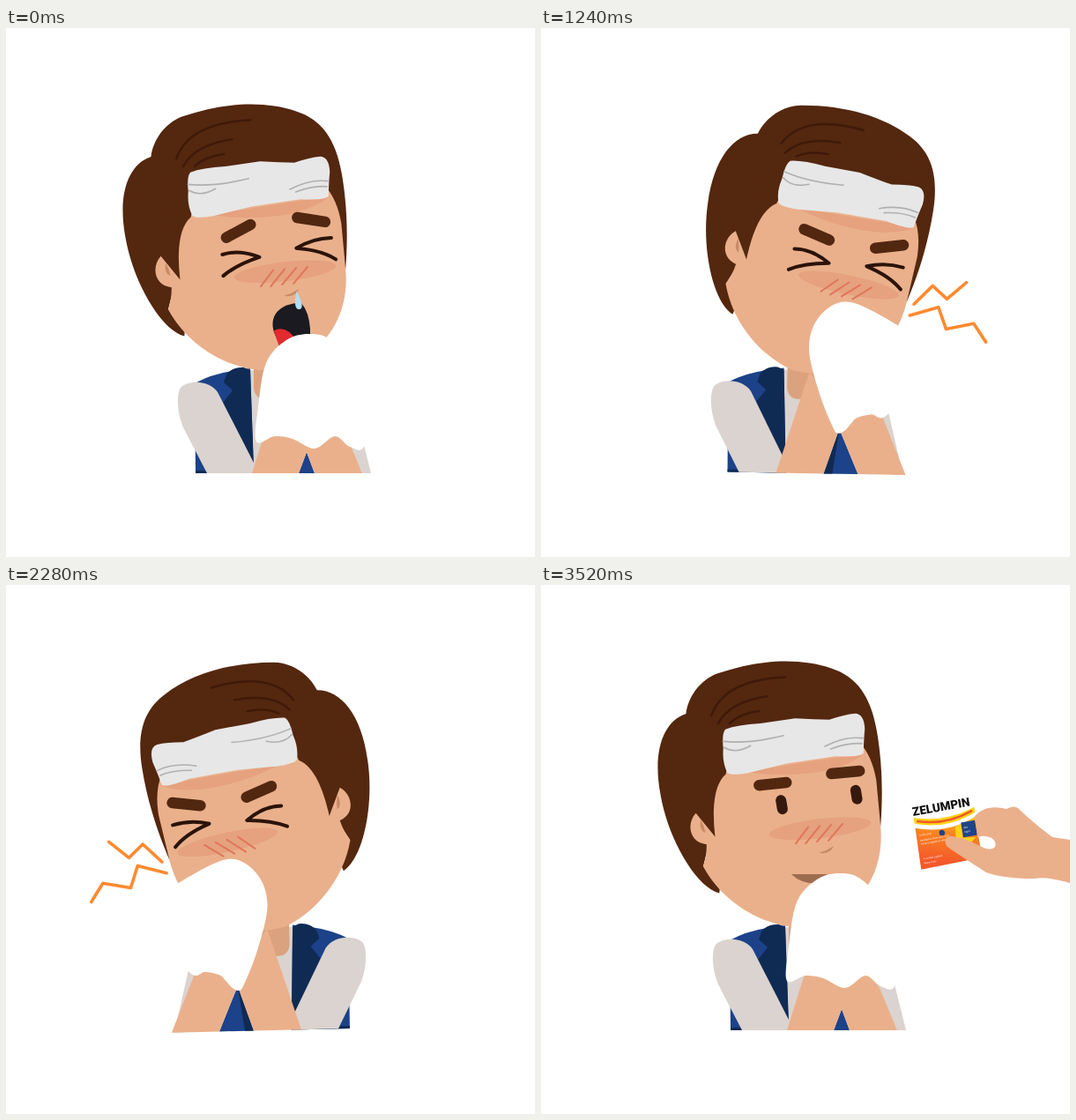
An HTML page that plays this animation: 600 by 600 pixels, repeating every 4280 ms.

```html
<!DOCTYPE html>
<html lang="en">
<head>
<meta charset="utf-8">
<style>
html, body { margin: 0; width: 100%; height: 100%; overflow: hidden; background: #fff; }
svg { display: block; width: 100vw; height: 100vh; }
.skin { fill: #eab08b; }
.blush { fill: #e6a17f; }
.shade { fill: #c78a64; }
.hair { fill: #54270f; }
.cloth { fill: #dbd3cf; }
.vest { fill: #1c4289; }
.navy { fill: #0f2b54; }
.line { fill: none; stroke-linecap: round; stroke-linejoin: round; }
.strands { stroke: #3f1a08; stroke-width: 2.5; }
.folds { stroke: #b0b0b0; stroke-width: 1.6; }
.brow { stroke: #522710; stroke-width: 12.5; }
.shut { stroke: #2b1309; stroke-width: 4; }
.open { stroke: #35190d; stroke-width: 12; }
.flush { stroke: #e0765a; stroke-width: 2; }
.spark { stroke: #ff8a30; stroke-width: 3.6; }
</style>
</head>
<body>
<svg viewBox="0 0 600 600">
  <defs>
    <linearGradient id="pack" x1="1" y1="0" x2=".6" y2="1">
      <stop offset="0" stop-color="#ffc81e"/>
      <stop offset=".4" stop-color="#f98420"/>
      <stop offset="1" stop-color="#f4582a"/>
    </linearGradient>
  </defs>

  <g id="figure">
    <g id="torso">
      <path class="cloth" d="M277 388H312L318 470 281 505Z"/>
      <path fill="#dba27f" d="M281 378V408Q282 420 293 421H325V378Z"/>
      <path class="vest" d="M214 403Q232 393 256 389L277 386 281 505H215Z"/>
      <path class="navy" d="M250 393Q257 384 270 385L277 388 281 497 246 425 257 411 247 402Z"/>
      <path class="navy" d="M215 502H281V505H215Z"/>
      <path class="cloth" d="M228 505L201 453C194 436 193 416 198 408C207 399 230 399 240 413L283 497 280 505Z"/>
    </g>

    <g id="head">
      <path class="hair" d="M207 129C212 112 228 94 250 90C300 82 345 88 378 106C405 120 417 145 417 185C417 230 409 268 403 292L300 240 205 285 197 303 216 312 210 336C185 325 163 265 163 215C162 165 180 133 207 129Z"/>
      <path class="skin" d="M240 204Q219 217 216 272L199 242C186 252 186 274 205 279Q203 292 197 303C211 345 249 378 286 388C350 395 398 355 403 292L407 240Q407 212 396 195L245 190Z"/>
      <path class="shade" d="M203 250Q199 262 206 266Q206 258 203 250Z"/>
      <path class="blush" d="M262 205L400 207Q375 221 335 219Q295 217 262 205Z"/>
      <path fill="#e7e7e7" d="M248 154Q262 151 288 154L328 155Q350 160 366 163Q385 160 396 161Q406 163 404 180Q400 195 398 207Q394 211 366 205L310 204 265 207Q245 207 242 203Q238 190 242 175Q243 158 248 154Z"/>
      <path class="line folds" d="M243 167Q272 175 312 172M243 174Q255 184 273 177M356 192Q380 184 400 190M362 196Q384 192 398 196"/>
      <path class="line strands" d="M235 136C250 108 285 102 325 107M241 146Q258 124 301 125M254 148Q268 139 289 140"/>
      <ellipse class="blush" cx="335" cy="283" rx="58" ry="11" transform="rotate(3 335 283)"/>
      <path class="line flush" d="M305 295L322 279M316 297L335 280M329 297L348 281M342 298L361 282"/>
      <path class="shade" d="M329 310Q338 309 347 305Q341 314 329 310Z"/>
      <path id="browL" class="line brow" d="M-15 0H16"/>
      <path id="browR" class="line brow" d="M-16 0H16"/>
      <g id="sick">
        <path class="line shut" d="M268 252Q288 249 309 262Q282 266 265 276M393 254Q372 251 352 259Q380 266 394 279"/>
        <path fill="#1b1a20" d="M311 349C308 330 322 317 347 321Q354 333 352 352L348 375 315 365Z"/>
        <path fill="#e12b2f" d="M311 347Q327 342 335 364L330 372 314 366Z"/>
        <path fill="#b5dcee" d="M344 307Q336 327 344 328Q351 327 344 307Z"/>
      </g>
      <g id="calm">
        <path class="line open" d="M296.600 244V254M382 247V257"/>
        <path fill="#9d6c4f" d="M294 328.500L334.500 335.400 330 345Q305 344 294 328.500Z"/>
      </g>
    </g>

    <path id="gap" class="vest"/>
    <path id="lapel" class="navy"/>
    <path id="sleeve" class="cloth"/>
    <path id="armL" class="skin"/>
    <path id="armR" class="skin"/>
    <path id="tissue" fill="#fff"/>
    <path id="sparks" class="line spark" d="M423 311L443 289 460 303 481 283M419 324L451 313 461 337 492 329 507 349"/>
  </g>

  <g id="hand">
    <g transform="translate(421 256) rotate(-10)">
      <path fill="#fff" d="M0 -8H69V67H0Z"/>
      <path fill="#ffd21a" d="M0 8Q35 20 70 8V14Q35 28 0 15Z"/>
      <path class="line" stroke="#ee5a24" stroke-width="2.500" d="M4 13Q35 23 66 12"/>
      <path fill="url(#pack)" d="M0 20Q35 33 69 19V66L-1.500 67.500Z"/>
      <path fill="#ffd21a" d="M45 27L52 24 51 40 66 42 60 47 43 42Z"/>
      <path fill="#1d4489" d="M52 23H68V40H52Z"/>
      <circle cx="29" cy="30.500" r="3.300" fill="#1d4489"/>
      <g font-family="Roboto, sans-serif" fill="#fff" font-size="3">
        <text x="0" y="6" font-size="13.500" font-weight="900" fill="#111">ZELUMPIN</text>
        <text x="3" y="30">for flu and</text>
        <text x="3" y="36">headache, fever and cold</text>
        <text x="3" y="40">nasal congestion relief</text>
        <text x="3" y="57">4 coated caplets</text>
        <text x="3" y="62">Keep it dry</text>
        <text x="54" y="30">day</text>
        <text x="54" y="35">night</text>
      </g>
    </g>
    <path class="skin" d="M640 296L600 289 580 286Q560 271 544 256Q538 248 528 254Q505 248 492 262L495 286Q503 283 511 287Q517 291 515 297Q510 302 500 297Q475 284 463 285Q455 288 461 297Q480 310 505 326Q525 333 560 333Q572 330 600 338L640 345Z"/>
  </g>
</svg>
<script>
const LOOP = 4280, STEP = 40;
const BACK = -9.7, FORWARD = 7.8, HALF = 2.5;
const el = {};
document.querySelectorAll('[id]').forEach(node => el[node.id] = node);

// Tissue outline, clockwise from the lower left corner
const raised = [284,469, 286,430, 295,380, 318,354, 345,347, 371,356, 410,400, 407,472, 390,475, 373,463, 350,477, 325,466, 305,463];
const middle = [300,463, 297,425, 299,370, 315,339, 345,328, 387,351, 415,390, 393,442, 385,446, 373,457, 361,460, 335,455, 318,454];
const sneezed = [334,453, 317,412, 305,362, 317,326, 350,310, 408,337, 440,360, 397,435, 377,437, 361,441, 354,448, 347,456, 340,459];

const mix = (a, b, u) => a + (b - a) * u;
const mixAll = (a, b, u) => a.map((v, i) => mix(v, b[i], u));
const ramp = (t, from, to) => {
  const u = Math.min(1, Math.max(0, (t - from) / (to - from)));
  return u * u * (3 - 2 * u);
};
const during = (t, from, to) => t >= from && t < to;
const move = (node, value) => node.setAttribute('transform', value);
const show = (node, on) => node.setAttribute('display', on ? 'inline' : 'none');
const polygon = (node, ...p) => node.setAttribute('d', `M${p.join(' ')}Z`);

function smoothLoop(p) {
  const n = p.length / 2;
  const at = i => { const k = (i + n) % n; return [p[2 * k], p[2 * k + 1]]; };
  let d = `M${at(0)}`;
  for (let i = 0; i < n; i++) {
    const [a, b, c, e] = [at(i - 1), at(i), at(i + 1), at(i + 2)];
    d += `C${b.map((v, j) => v + (c[j] - a[j]) / 6)} ${c.map((v, j) => v - (e[j] - b[j]) / 6)} ${c}`;
  }
  return d + 'Z';
}

function headAngle(t) {
  if (t < 1000) return mix(BACK, FORWARD, ramp(t, 20, 530));
  if (t < 1720) return mix(FORWARD, HALF, ramp(t, 1440, 1700));
  if (t < 2500) return mix(HALF, FORWARD, ramp(t, 1700, 1880));
  return mix(FORWARD, BACK, ramp(t, 2680, 3400));
}

function draw(t) {
  const angle = headAngle(t);
  const lean = (angle - BACK) / (FORWARD - BACK);
  const awake = t >= 3280;
  const lift = ramp(t, 3240, 3480);

  // Whole figure trembles while sneezing
  const force = ramp(t, 540, 590) - ramp(t, 1380, 1450) + ramp(t, 1840, 1900) - ramp(t, 2600, 2680);
  const wave = Math.sin((t - 366.7) / 350 * 2 * Math.PI);
  const tremble = force * (0.9 + 2.3 * wave);
  const mirror = during(t, 1720, 2840) ? 'translate(600 0) scale(-1 1) ' : '';
  move(el.figure, `${mirror}rotate(${tremble} 300 300)`);
  move(el.head, `rotate(${angle} 286 388)`);

  show(el.sick, !awake);
  show(el.calm, awake);
  const tilt = awake ? 4 : 1.9 * angle;
  const rise = awake ? 8 : 3 * (1 - lean);
  move(el.browL, `translate(290 ${232 - rise}) rotate(${tilt})`);
  move(el.browR, `translate(374 ${233 - rise}) rotate(${awake ? tilt : -tilt})`);

  const left = mix(279, 270, lean), right = mix(404, 417, lean);
  const innerL = mix(332, 324, lean), innerR = mix(350, 363, lean);
  const top = mix(481, 454, lean);
  const fold = Math.max(0, lean - 0.55) * 22;
  polygon(el.gap, innerL, 505, 341, top, innerR, 505);
  polygon(el.lapel, innerL, 505, 341, top, innerL + fold, 505);
  polygon(el.sleeve, right - 32, 433, 396, 433, 414, 505, 404, 505);
  polygon(el.armL, left, 505, left + 36, 390, 345, 440, 341, top, innerL, 505);
  polygon(el.armR, innerR, 505, 341, top, 341, 440, right - 30, 433, right, 505);

  const split = 0.554;
  const outline = lean < split
    ? mixAll(raised, middle, lean / split)
    : mixAll(middle, sneezed, (lean - split) / (1 - split));
  el.tissue.setAttribute('d', smoothLoop(outline));
  move(el.tissue, `translate(${-5 * lift} ${-20 * lift})`);

  show(el.sparks, during(t, 600, 1400) || during(t, 1960, 2640));
  move(el.sparks, `rotate(${(tremble - 0.2) * 3.2} 421 316)`);

  show(el.hand, t >= 3080);
  move(el.hand, `translate(${190 * (1 - ramp(t, 3080, 3520))} 0)`);
}

function tick() {
  draw(Math.floor(performance.now() % LOOP / STEP) * STEP);
  requestAnimationFrame(tick);
}
tick();
</script>
</body>
</html>
```
